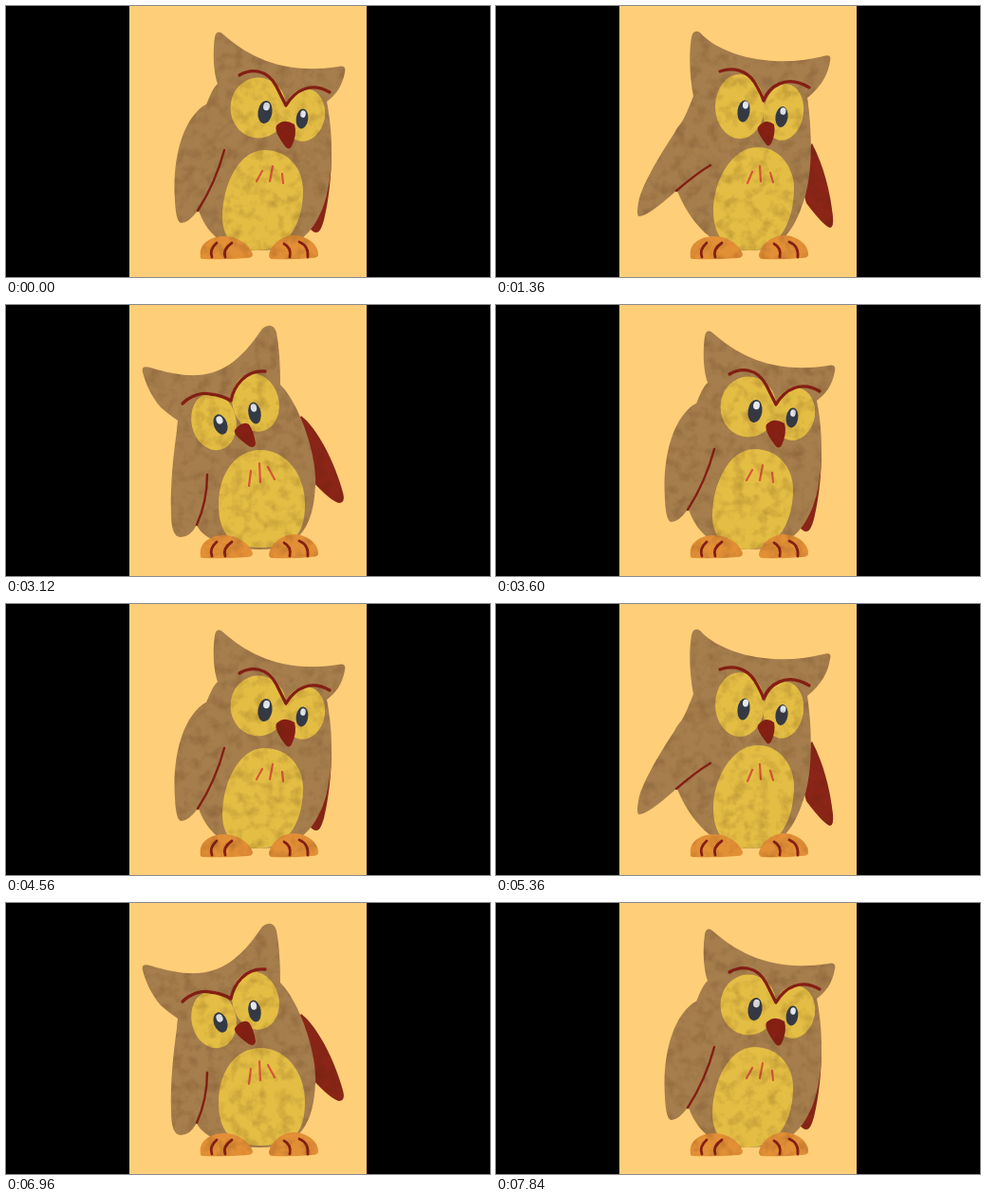
Animation, 510 px wide and 286 px high, one loop 7920 ms. Source, as an HTML page:

```html
<!DOCTYPE html>
<html lang="en">
<head>
<meta charset="utf-8">
<title>Swaying owl</title>
<style>
html, body { margin: 0; width: 100%; height: 100%; overflow: hidden; background: #000; }
svg { display: block; width: 100vw; height: 100vh; }
</style>
</head>
<body>
<svg viewBox="0 0 510 286">
  <defs>
    <clipPath id="panel"><path d="M130 0H380V286H130Z"/></clipPath>
    <filter id="paper" filterUnits="userSpaceOnUse" x="130" y="0" width="250" height="286" color-interpolation-filters="sRGB">
      <feTurbulence id="grain" type="fractalNoise" baseFrequency=".08" numOctaves="3"/>
      <feColorMatrix values="0 0 0 0 .3  0 0 0 0 .15  0 0 0 0 .05  .5 0 0 0 -.22"/>
      <feComposite in2="SourceGraphic" operator="in" result="spots"/>
      <feMerge><feMergeNode in="SourceGraphic"/><feMergeNode in="spots"/></feMerge>
    </filter>
  </defs>
  <g clip-path="url(#panel)">
    <path fill="#ffce78" d="M130 0H380V286H130Z"/>
    <g filter="url(#paper)">
      <g id="owl" stroke-linecap="round" stroke-linejoin="round"></g>
      <g fill="#e28f36">
        <path d="M205 264C203 252 214 243 230 243C246 243 258 254 260 262Q260 266 254 266Q230 268 208 267Q204 267 205 264Z"/>
        <path d="M277 263C279 252 290 242 304 242C320 243 330 254 329 263Q328 266 322 266Q300 268 280 267Q277 266 277 263Z"/>
      </g>
      <path fill="none" stroke="#861f14" stroke-width="2.8" stroke-linecap="round"
        d="M222 250Q214 257 217 265M238 250Q228 257 231 265M293 251Q301 255 299 265M309 249Q319 253 318 265"/>
    </g>
  </g>
</svg>
<script>
const BROWN = '#a67e4d', YELLOW = '#e4be44', RED = '#861f14', DARK = '#343a46', WHITE = '#e4e9f0';
const STEP = 80, LOOP = 7920, SWAY = 4000, TURN = 400;
const owl = document.getElementById('owl'), grain = document.getElementById('grain');
const parts = [];

function add(tag, attr, style, keys) {
  const el = document.createElementNS('http://www.w3.org/2000/svg', tag);
  for (const name in style) el.setAttribute(name, style[name]);
  owl.append(el);
  parts.push({ el, attr, keys, times: keys.length === 3 ? [0, .2, 1] : [0, .2, .5, .8, 1] });
}
const shape = (fill, ...keys) => add('path', 'd', { fill }, keys);
const line = (stroke, width, ...keys) => add('path', 'd', { fill: 'none', stroke, 'stroke-width': width }, keys);
// each key: centre x, centre y, radius x, radius y, rotation
const oval = (fill, ...keys) => add('circle', 'transform', { r: 1, fill },
  keys.map(([x, y, rx, ry, a]) => `translate(${x} ${y}) rotate(${a}) scale(${rx} ${ry})`));

// far wing
shape('#8a2517',
  'M343 152C343 180 340 205 335 226Q331 240 327 239Q323 239 319 233L320 170Z',
  'M333 145C345 168 352 195 355 222Q356 234 352 234Q345 232 327 208L315 165Z',
  'M322 128C348 138 378 160 392 188Q400 208 391 209Q368 208 326 195L305 150Z',
  'M315 121C332 133 356 165 364 197Q368 212 362 213Q350 210 326 190L300 145Z',
  'M311 117C328 130 346 165 355 198Q358 209 351 209Q342 207 323 186L295 140Z');

// head and body
shape(BROWN,
  'M220 33Q222 24 229 30C255 53 292 73 350 64Q359 62 357 70C354 86 347 94 338 101C344 130 347 180 333 215C322 240 308 258 265 258C225 258 210 235 203 216C185 180 185 115 211 104C215 95 217 88 223 82C218 68 218 48 220 33Z',
  'M206 33Q208 24 215 28C238 54 295 66 345 53Q354 50 352 58C350 72 343 85 328 97C333 130 335 180 322 212C312 240 298 258 268 258C230 258 205 230 190 193C188 160 180 140 194 125C199 118 203 108 208 95C204 75 203 50 206 33Z',
  'M144 71Q142 63 152 66C210 84 238 73 270 25Q281 17 285 29C288 45 289 65 289 84C310 105 328 160 326 190C324 230 312 258 268 258C230 258 205 245 200 230C185 200 178 150 181 122C175 118 169 113 163 108C152 95 147 82 144 71Z');

// belly
shape(YELLOW,
  'M272 152C298 152 313 172 313 195C313 225 300 258 266 258C240 258 228 245 228 222C228 190 245 152 272 152Z',
  'M276 149C300 149 314 172 314 192C314 225 300 258 268 258C240 258 229 242 229 215C229 185 248 149 276 149Z',
  'M268 153C296 153 315 180 315 210C315 245 300 256 268 256C236 256 224 240 224 210C224 178 242 153 268 153Z');
line('#d8553a', 2.2,
  'M270 174L264 185M281 169L278 185M291 177L292 187',
  'M270 175L265 187M278 169L279 185M289 176L292 186',
  'M258 175L256 191M267 167L268 187M276 171L283 184');

// near wing and its inner edge
const wing = [
  'M211 104C185 118 175 165 178 205Q179 229 185 229Q192 229 202 216C216 194 224 175 230 152Z',
  'M194 125C180 146 158 180 151 203Q147 222 151 222Q160 222 190 195C204 183 214 175 226 168Z',
  'M190 126C170 135 145 150 128 172Q112 196 119 199Q140 202 189 192C200 186 210 180 220 173Z',
  'M182 130C174 150 160 185 155 212Q153 238 160 237Q174 236 194 218C203 206 209 193 214 180Z',
  'M181 125C176 160 173 190 174 220Q174 245 184 245Q194 245 201 232C209 214 212 198 212 179Z'];
shape(BROWN, ...wing);
line(RED, 2.4, ...wing.map(d => 'M' + d.match(/(\d+ \d+C[^C]+)Z/)[1]));

// face
oval(YELLOW, [266, 107.5, 29.5, 32, 0], [257, 106, 26, 34, 0], [219, 123, 23.5, 30.5, -12]);
oval(YELLOW, [314, 115, 22, 28, 10], [303, 112, 21, 30, 8], [263, 103, 24.5, 31, -14]);
line(RED, 3.3,
  'M246 73C258 66 275 66 285 85C289 93 292 99 295 105C305 88 322 80 341 91',
  'M236 69C250 64 264 68 272 80C277 88 280 94 282 100C287 86 305 71 330 86',
  'M186 104C195 95 207 92 215 94C225 95 232 98 237 101C240 86 252 68 273 70');
oval(DARK, [273, 112, 7.5, 12, 8], [261, 111, 6.5, 11.5, 8], [226, 126, 7, 11, -20]);
oval(DARK, [312, 119, 6.3, 10.5, 8], [301, 117, 6.5, 11, 8], [262, 114, 6.6, 11.5, -10]);
oval(WHITE, [274.5, 106, 3.4, 4.3, 8], [263, 104.5, 3, 4, 8], [225, 121.5, 3.4, 4.2, -20]);
oval(WHITE, [313, 114, 2.8, 3.8, 8], [302.5, 111, 3, 3.8, 8], [261, 108.5, 3.2, 4.2, -10]);
shape(RED,
  'M285 126Q293 118 304 125Q307 135 301 148Q298 153 294 148Q282 132 285 126Z',
  'M276 128Q284 118 293 125Q295 134 290 145Q287 150 284 145Q274 132 276 128Z',
  'M241 132Q249 122 256 126Q261 133 263 146Q262 152 256 149Q239 137 241 132Z');

const clamp = x => Math.max(0, Math.min(1, x));

// blend the numbers of two equally built attribute strings
function mix(a, b, k) {
  const nums = b.match(/-?[\d.]+/g);
  let i = 0;
  return a.replace(/-?[\d.]+/g, n => (+n + (nums[i++] - n) * k).toFixed(2));
}

function draw(now) {
  const frame = Math.floor(now % LOOP / STEP), u = frame * STEP % SWAY;
  const lean = clamp((u - 1280) / TURN) - clamp((u - 3120) / TURN);
  for (const { el, attr, keys, times } of parts) {
    let i = 0;
    while (i < times.length - 2 && lean > times[i + 1]) i++;
    el.setAttribute(attr, mix(keys[i], keys[i + 1], (lean - times[i]) / (times[i + 1] - times[i])));
  }
  grain.setAttribute('seed', frame + 1);
}

const start = performance.now();
function tick() {
  draw(performance.now() - start);
  requestAnimationFrame(tick);
}
tick();
</script>
</body>
</html>
```
